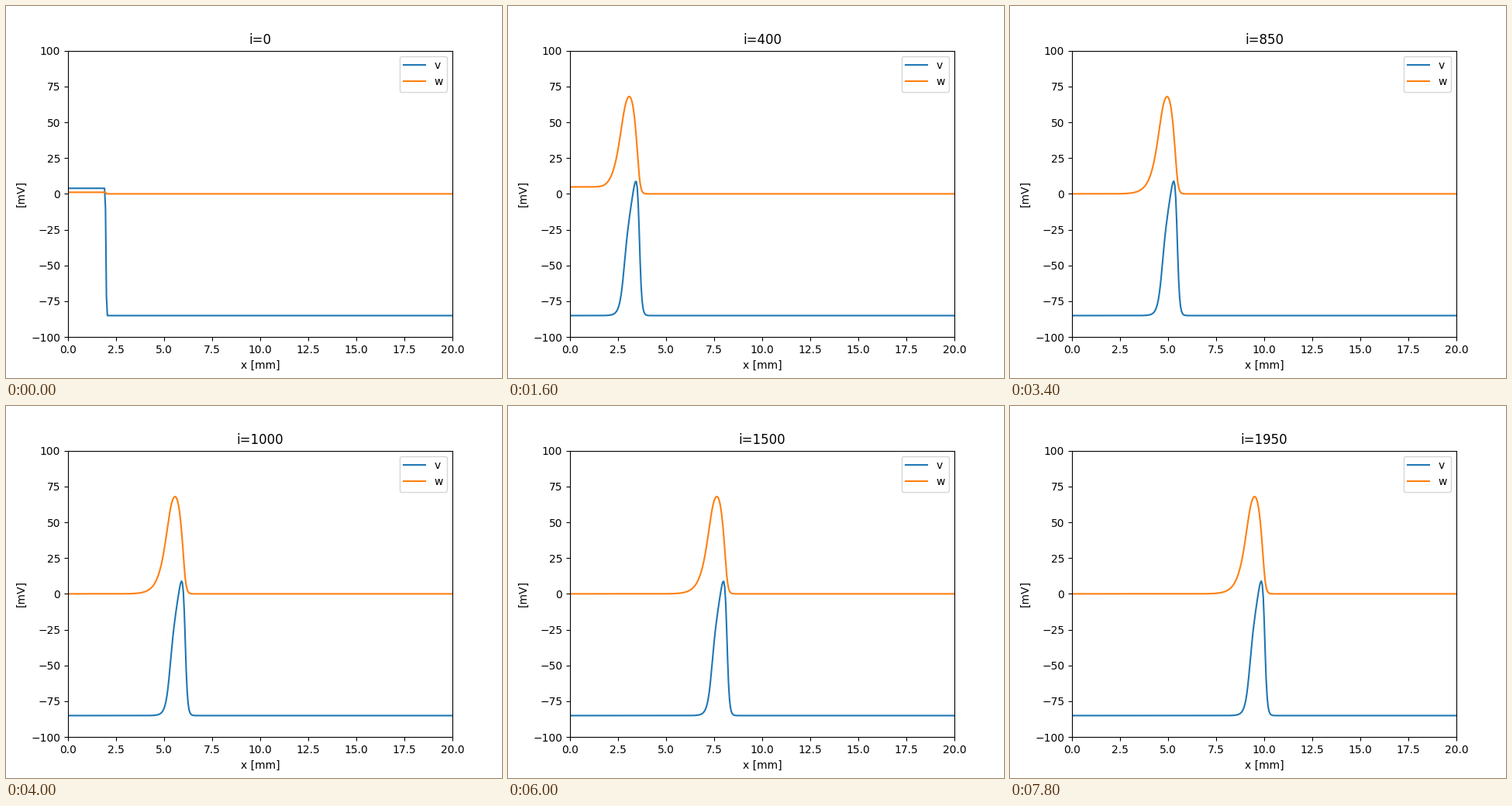
A matplotlib script that plays this animation: 640 by 480 pixels, repeating every 8 s.

```python
import numpy as np
import matplotlib.pyplot as plt
from matplotlib.animation import FuncAnimation

# Rogers-McCulloch excitable cable, time step 1
V_REST, V_PEAK = -85.0, 40.0
AMP = V_PEAK - V_REST
A, B, C1, C2 = 0.13, 0.013, 0.26, 0.1
DX = 0.05
X = np.arange(401) * DX
FRAMES, STRIDE = 40, 50
CREST_END = 9.84  # where the crest stands at the end, in mm


def simulate(diff):
    """Return the (v, w) states, in mV, after every STRIDE steps."""
    r = diff / DX**2
    u = np.where(X < 2 - DX / 2, -V_REST / AMP, 0.0)
    w = np.zeros_like(u)
    pad = np.empty(len(u) + 2)
    states = []
    for i in range((FRAMES - 1) * STRIDE + 1):
        pad[1:-1] = u
        pad[0], pad[-1] = u[1], u[-2]  # sealed ends
        lap = pad[:-2] - 2 * u + pad[2:]
        du = r * lap + u * (C1 * (1 - u) * (u - A) - C2 * w)
        w = w + B * (u - w)
        u = u + du
        if i % STRIDE == 0:
            states.append((V_REST + AMP * u, AMP * w))
    return states


def crest(v):
    """Crest position, refined with a parabola through three points."""
    k = int(np.clip(np.argmax(v), 1, len(v) - 2))
    a, b, c = v[k - 1:k + 2]
    bend = a - 2 * b + c
    shift = 0.5 * (a - c) / bend if abs(bend) > 1e-6 else 0.0
    return X[k] + shift * DX


def tune(lo=2e-4, hi=7e-4):
    """Bisect the diffusivity that brings the crest to CREST_END."""
    for _ in range(14):
        mid = (lo + hi) / 2
        if crest(simulate(mid)[-1][0]) < CREST_END:
            lo = mid
        else:
            hi = mid
    return (lo + hi) / 2


states = simulate(tune())

fig, ax = plt.subplots(figsize=(6.4, 4.8), dpi=100)
line_v, = ax.plot(X, states[0][0], label="v")
line_w, = ax.plot(X, states[0][1], label="w")
title = ax.set_title("i=0")
ax.set(xlim=(0, 20), ylim=(-100, 100), xlabel="x [mm]", ylabel="[mV]")
ax.legend(loc="upper right")


def draw(n):
    v, w = states[n]
    line_v.set_ydata(v)
    line_w.set_ydata(w)
    title.set_text(f"i={n * STRIDE}")
    return line_v, line_w, title


anim = FuncAnimation(fig, draw, frames=FRAMES, interval=200, repeat=True)
plt.show()
```
